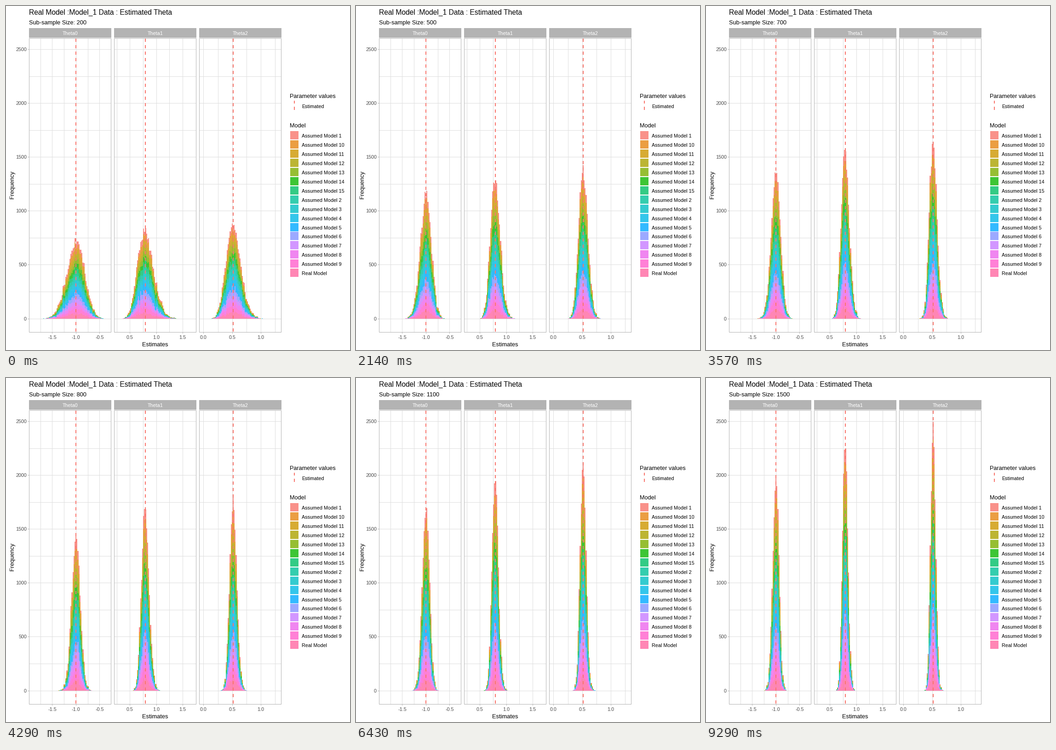
Recreate the animation shown at these times as a matplotlib script. Size 748 by 748 pixels, loop 10000 ms.

```python
import numpy as np
import matplotlib.pyplot as plt
from matplotlib.animation import FuncAnimation
from matplotlib.patches import Rectangle

SIZE, DPI = 748, 88
PX = 72 / DPI                       # points per pixel
plt.rcParams["font.family"] = "Liberation Sans"

LOOP, STEP = 10000, 50              # ms
FRAMES = LOOP // STEP
SIZES = range(200, 1501, 100)

TOP, BOTTOM, ZERO = 69.5, 708.5, 679.5
PER_COUNT = 0.2342                  # pixels per unit of frequency
BIN = 2.186                         # bin width in pixels
DRAWS = 1000                        # estimates per model
CUTOFF = 0.08                       # thins out the far tails

GREY, GRID, TEXT = "#b3b3b3", "#dedede", "#4d4d4d"
RED = "#f8766d"
HUES = ["#F8766D", "#E68613", "#CD9600", "#ABA300", "#7CAE00", "#0CB702",
        "#00BE67", "#00C19A", "#00BFC4", "#00B8E7", "#00A9FF", "#8494FF",
        "#C77CFF", "#ED68ED", "#FF61CC", "#FF68A1"]
MODELS = [f"Assumed Model {k}" for k in
          sorted(range(1, 16), key=str)] + ["Real Model"]

# positions in pixels: left edge, first tick (value, x), half-unit step,
# first grid line, dashed line, a bin centre, mean, spread at n = 1500;
# power of n for the spread, skew at n = 200
PANELS = [
    dict(left=50.5, tick=(-1.5, 100.5), step=51.5, grid=74.75, line=152,
         mid=152.2, mean=152.2, sd=6.9, power=0.52, skew=-0.18),
    dict(left=235.5, tick=(0.5, 269.5), step=57.2, grid=240.9, line=303,
         mid=301.4, mean=302.5, sd=6.0, power=0.53, skew=0.36),
    dict(left=420.5, tick=(0.0, 429.5), step=62.2, grid=429.5, line=494,
         mid=494.0, mean=493.8, sd=5.65, power=0.53, skew=0.28),
]
WIDTH = 178

fig = plt.figure(figsize=(SIZE / DPI, SIZE / DPI), dpi=DPI, facecolor="white")
ax = fig.add_axes([0, 0, 1, 1])
ax.set_xlim(0, SIZE)
ax.set_ylim(SIZE, 0)
ax.axis("off")


def text(x, y, s, px=10.7, color="black", **kw):
    return ax.text(x, y, s, fontsize=px * PX, color=color, **kw)


def line(xs, ys, color, width=1, z=1, **kw):
    ax.plot(xs, ys, color=color, lw=width * PX, zorder=z,
            solid_capstyle="butt", **kw)


def dashed(x, y0, y1):
    line([x, x], [y0, y1], RED, 2, z=5, linestyle=(0, (3.5, 3.5)))


def box(x, y, w, h, z=2, **kw):
    ax.add_patch(Rectangle((x, y), w, h, zorder=z, **kw))


def draw_panel(p, name):
    left, right = p["left"], p["left"] + WIDTH
    for k in range(11):
        y = ZERO - 250 * k * PER_COUNT
        line([left, right], [y, y], GRID)
    x = p["grid"]
    while x < right:
        line([x, x], [TOP, BOTTOM], GRID)
        x += p["step"] / 2
    value, x = p["tick"]
    while x < right:
        line([x, x], [BOTTOM, BOTTOM + 3], GREY)
        text(x, 724, f"{value:.1f}", color=TEXT, ha="center")
        value, x = value + 0.5, x + p["step"]
    box(left, TOP, WIDTH, BOTTOM - TOP, z=6, fill=False, ec=GREY, lw=PX)
    box(left - 0.5, 48, WIDTH + 1, 20.5, fc=GREY, lw=0)
    text(left + WIDTH / 2, 63, name, color="white", ha="center")
    dashed(p["line"], 708, 70)

    first = p["mid"] - BIN * (np.floor((p["mid"] - left) / BIN) - 0.5)
    p["edges"] = np.arange(first, right, BIN)
    empty = np.full(len(p["edges"]) - 1, ZERO)
    p["bars"] = [ax.stairs(empty, p["edges"], baseline=empty, fill=True,
                           color=c, alpha=0.8, lw=0, antialiased=False,
                           zorder=3) for c in HUES]


def expected(p, n):
    """Mean count per bin for one model at sub-sample size n."""
    sd = p["sd"] * (1500 / n) ** p["power"]
    skew = p["skew"] * np.sqrt(200 / n)
    mean = p["mean"] + skew * sd / 3
    z = (p["edges"][:-1] + BIN / 2 - mean) / sd
    shape = np.exp(-z * z / 2) * (1 + skew / 6 * (z ** 3 - 3 * z))
    counts = DRAWS * BIN / (sd * np.sqrt(2 * np.pi)) * shape
    return np.clip(counts - CUTOFF, 0, None)


for i, panel in enumerate(PANELS):
    draw_panel(panel, f"Theta{i}")

for k in range(6):
    y = ZERO - 500 * k * PER_COUNT
    line([47, 50], [y, y], GREY)
    text(45, y + 4, str(500 * k), color=TEXT, ha="right")

text(50, 19, "Real Model :Model_1 Data : Estimated Theta", 15.6)
subtitle = text(50, 40, "", 12.8)
text(324.5, 740, "Estimates", 12.9, ha="center")
text(17.5, 388.5, "Frequency", 12.9, rotation=90, ha="center",
     va="baseline", rotation_mode="anchor")

text(617, 200, "Parameter values", 12.8)
dashed(627, 226, 206)
text(643, 222, "Estimated")
text(617, 264, "Model", 12.8)
for i, (name, hue) in enumerate(zip(MODELS, HUES)):
    y = 272 + 19.95 * i
    box(618, y, 18, 18, fc=hue, alpha=0.8, lw=0)
    text(643, y + 14, name)


def show(n):
    rng = np.random.default_rng(n)
    subtitle.set_text(f"Sub-sample Size: {n}")
    for p in PANELS:
        mean = expected(p, n)
        counts = rng.poisson(mean, (len(HUES), len(mean)))
        base = np.full(len(mean), ZERO)
        # the last model lies at the bottom of the stack
        for bar, c in zip(reversed(p["bars"]), counts):
            top = base - c * PER_COUNT
            bar.set_data(top, p["edges"], base)
            base = top


def update(i):
    # each step shows the size reached by its end
    show(SIZES[int((i + 0.99) * len(SIZES) / FRAMES)])


anim = FuncAnimation(fig, update, frames=FRAMES, init_func=lambda: update(0),
                     interval=STEP, repeat=True, repeat_delay=0)
plt.show()
```
